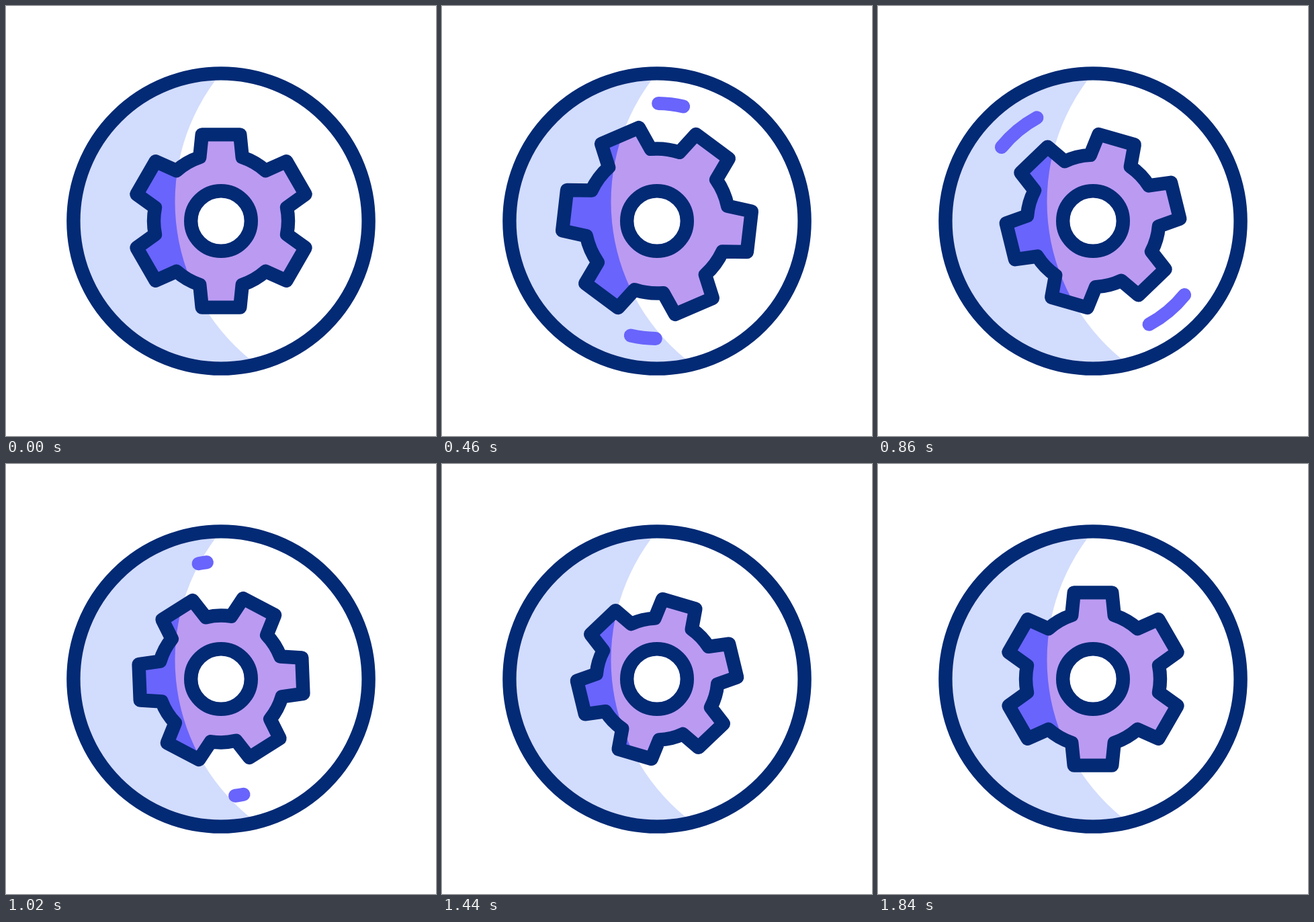
These frames come from a looping animation (640x640 px, 2420 ms). An HTML page with a canvas:

```html
<!DOCTYPE html>
<html>
<head>
<meta charset="utf-8">
<style>
  html, body { margin: 0; height: 100%; overflow: hidden; background: #fff; }
  canvas { display: block; }
</style>
</head>
<body>
<canvas id="stage" width="640" height="640"></canvas>
<script>
const ctx = document.getElementById('stage').getContext('2d');
const LOOP = 2420, RAD = Math.PI / 180, LINE = 20.4;
const NAVY = '#032a75', PALE = '#d2dcfd', LILAC = '#bb9af2', BLUE = '#6964fb';

// The gear winds up, spins past a full turn, then settles
const WIND = 200, SPIN = 1380, REST = 1840;

// Eased 0..1 progress from start to end: a cubic Bezier (x1, 0, x2, 1)
function ease(t, start, end, x1 = 1 / 3, x2 = 2 / 3) {
  const x = Math.min(1, Math.max(0, (t - start) / (end - start)));
  let lo = 0, hi = 1, u = x;
  for (let i = 0; i < 20; i++) {
    const v = 1 - u;
    if (3 * u * v * (v * x1 + u * x2) + u * u * u < x) lo = u; else hi = u;
    u = (lo + hi) / 2;
  }
  return u * u * (3 - 2 * u);
}

function disc(x, y, r) {
  const path = new Path2D();
  path.arc(x, y, r, 0, 2 * Math.PI);
  return path;
}

const ring = disc(0, 0, 219.6), hub = disc(0, 0, 44.8), light = disc(233.5, -28.5, 302);

function gear(t) {
  const wind = ease(t, 0, WIND), settle = ease(t, SPIN, REST);
  const turn = -9 * wind + 386.2 * ease(t, WIND, SPIN, 0.32, 0.78) - 17.2 * settle;
  const scale = 1 + 0.1 * wind - 0.2 * ease(t, WIND, SPIN) + 0.1 * settle;
  const base = 100 * scale, tip = 131.7 * scale;
  const path = new Path2D();
  for (let k = 0; k < 6; k++) {
    const mid = turn - 90 + k * 60;
    for (const side of [-12.4, 12.4]) {
      const a = (mid + side) * RAD;
      path.lineTo(tip * Math.cos(a), tip * Math.sin(a));
    }
    path.arc(0, 0, base, (mid + 18.5) * RAD, (mid + 41.5) * RAD);
  }
  path.closePath();
  return path;
}

// Two tones: shade on the left, lit colour inside the large offset circle
function fillTwoTone(path, shade, lit) {
  ctx.fillStyle = shade;
  ctx.fill(path);
  ctx.save();
  ctx.clip(path);
  ctx.fillStyle = lit;
  ctx.fill(light);
  ctx.restore();
}

function outline(path) {
  ctx.strokeStyle = NAVY;
  ctx.lineWidth = LINE;
  ctx.stroke(path);
}

// Two opposite streaks sweep half a circle, the head leaving before the tail
function streaks(t) {
  const sweep = start => 180 * ease(t, start, 1230, 0.6, 0.3);
  if (t <= 230 || t >= 1230) return;
  const head = sweep(230), tail = sweep(410);
  ctx.strokeStyle = BLUE;
  ctx.lineWidth = 20;
  for (const origin of [-90, 90]) {
    ctx.beginPath();
    ctx.arc(0, 0, 175, (origin + tail) * RAD, (origin + head) * RAD);
    ctx.stroke();
  }
}

function draw(now) {
  const t = now % LOOP;
  ctx.setTransform(1, 0, 0, 1, 0, 0);
  ctx.fillStyle = '#fff';
  ctx.fillRect(0, 0, 640, 640);
  ctx.translate(320, 320);
  ctx.lineCap = ctx.lineJoin = 'round';

  fillTwoTone(ring, PALE, '#fff');
  outline(ring);
  streaks(t);

  const cog = gear(t);
  fillTwoTone(cog, BLUE, LILAC);
  outline(cog);
  ctx.fillStyle = '#fff';
  ctx.fill(hub);
  outline(hub);
  requestAnimationFrame(draw);
}
draw(0);
</script>
</body>
</html>
```
